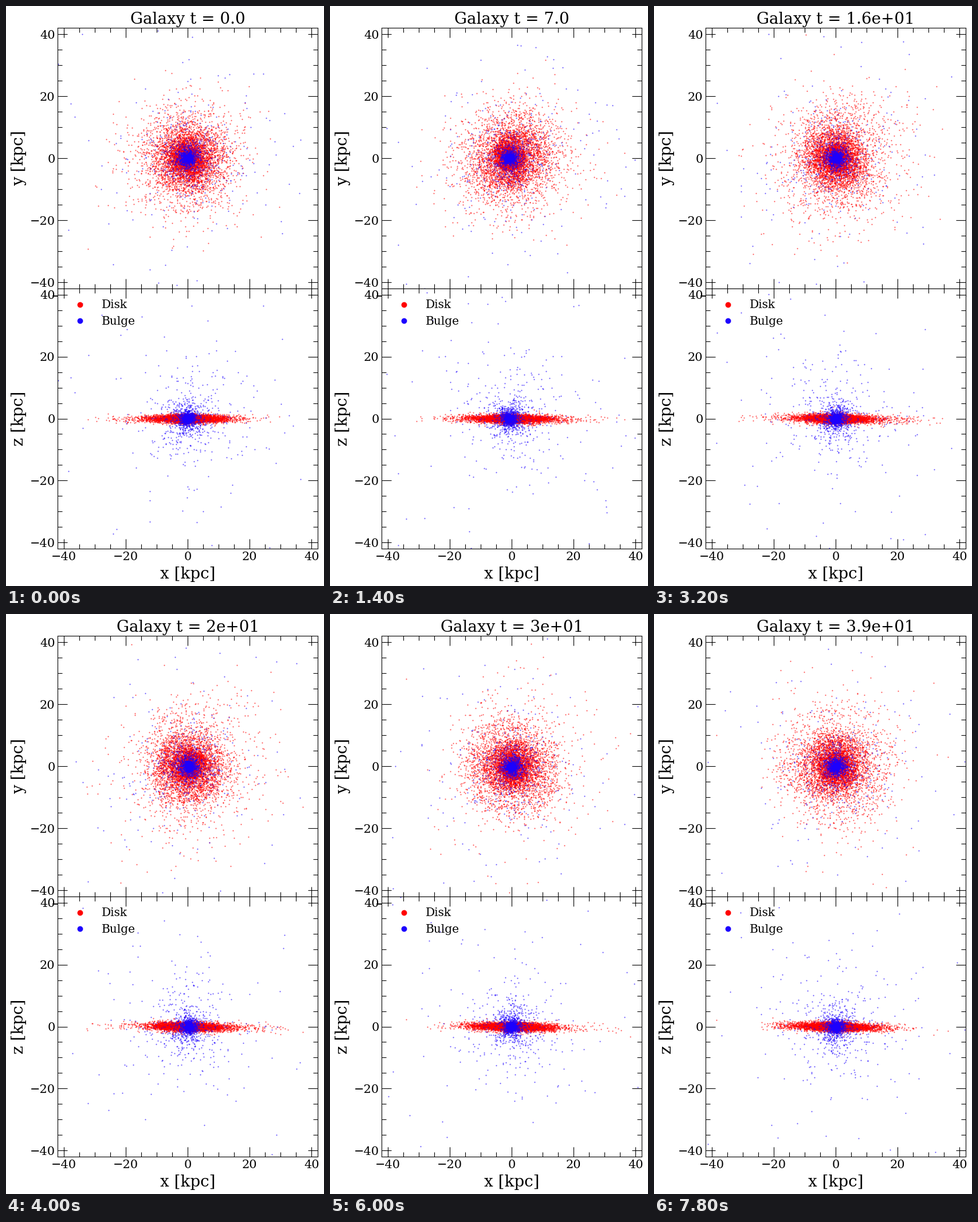
Recreate the animation shown at these times as a matplotlib script. Size 555 px wide and 1010 px high, loop 8000 ms.

```python
import numpy as np
import matplotlib.pyplot as plt
from matplotlib.animation import FuncAnimation
from matplotlib.ticker import MultipleLocator

W, H, DPI = 555, 1010, 100
FRAMES, INTERVAL = 40, 200
SUBSTEPS = 16
N_DISK, N_BULGE = 5800, 1750
V0 = 2.6      # flat rotation speed, kpc per frame
CORE = 1.0    # softening of the potential, kpc
RED, BLUE = "#ff0000", "#1c00ff"

plt.rcParams.update({"font.family": "DejaVu Serif", "font.size": 15})
rng = np.random.default_rng(12)


def v_circ(r):
    return V0 * r / np.sqrt(r**2 + CORE**2)


def make_disk(n):
    """Thin exponential disk, turning counter-clockwise, with a small kick."""
    r = rng.gamma(2, 3.5, n)
    th = rng.uniform(0, 2 * np.pi, n)
    v = v_circ(r)
    v_r = v * (0.1 * np.cos(2 * th + 0.6) + 0.06 * np.cos(th)
               + rng.normal(0, 0.17, n))
    v_t = v * (1 + rng.normal(0, 0.11, n))
    c, s = np.cos(th), np.sin(th)
    z = rng.normal(0, 0.65, n)
    v_z = rng.normal(0, 0.65, n) * v / np.hypot(r, CORE)
    pos = np.column_stack([r * c, r * s, z])
    vel = np.column_stack([v_r * c - v_t * s, v_r * s + v_t * c, v_z])
    return pos, vel


def make_bulge(n):
    """Isotropic Hernquist sphere."""
    q = np.sqrt(rng.uniform(0, 0.985**2, n))
    r = 1.1 * q / (1 - q)
    u = rng.normal(size=(n, 3))
    u /= np.linalg.norm(u, axis=1, keepdims=True)
    slope = (1 + 4 * r) / (1 + r)
    sigma = 1.12 * V0 * np.sqrt(r / (r + 1) / slope)
    return u * r[:, None], rng.normal(size=(n, 3)) * sigma[:, None]


def accel(pos):
    r2 = np.sum(pos**2, axis=1, keepdims=True)
    return -V0**2 * pos / (r2 + CORE**2)


def bump(t, mid, width):
    return np.exp(-((t - mid) / width)**2)


def disturb(pos, t):
    """Let the centre wander slightly and the disk plane tilt with time."""
    out = pos.copy()
    weight = 1 / (1 + np.sum(pos**2, axis=1) / 64)
    out[:, 0] += weight * (0.4 * bump(t, 20, 4) - 0.8 * bump(t, 7, 4))
    out[:, 1] += weight * (0.3 * bump(t, 10, 4) - 0.2 * bump(t, 30, 5))
    out[:, 2] -= 0.02 * min(t / 20, 1) * pos[:, 0]
    return out


def simulate():
    """Leapfrog all stars through the potential, one snapshot per frame."""
    pos, vel = (np.vstack(p) for p in zip(make_disk(N_DISK),
                                          make_bulge(N_BULGE)))
    dt = 1 / SUBSTEPS
    shots = []
    for t in range(FRAMES):
        shots.append(disturb(pos, t))
        for _ in range(SUBSTEPS):
            vel += accel(pos) * dt / 2
            pos += vel * dt
            vel += accel(pos) * dt / 2
    return shots


def make_panel(top, bottom, ylabel):
    ax = fig.add_axes([90.4 / W, 1 - bottom / H, 453.6 / W, (bottom - top) / H])
    ax.set(xlim=(-42, 42), ylim=(-42, 42))
    ax.set_ylabel(ylabel, fontsize=20)
    for axis in (ax.xaxis, ax.yaxis):
        axis.set_major_locator(MultipleLocator(20))
        axis.set_minor_locator(MultipleLocator(5))
    ax.tick_params(which="both", direction="in", top=True, right=True, width=0.8)
    ax.tick_params(which="major", length=12)
    ax.tick_params(which="minor", length=6)
    return ax


def star_layer(ax, color):
    return ax.plot([], [], "o", ms=1.5, mew=0, color=color, alpha=0.68)[0]


def legend_row(ax, y, color, name):
    ax.plot([-34.85], [y], "o", ms=7.1, mew=0, color=color, zorder=5)
    ax.text(-27.88, y - 1.25, name, fontsize=14.5, zorder=5)


fig = plt.figure(figsize=(W / DPI, H / DPI), dpi=DPI, facecolor="white")
# The lower panel hides most of the upper one's x tick labels.
face_on = make_panel(38.4, 491.8, "y [kpc]")
edge_on = make_panel(491.8, 945.2, "z [kpc]")
edge_on.set_xlabel("x [kpc]", fontsize=20, labelpad=4.7)
title = face_on.set_title("", fontsize=20, pad=5.3)
legend_row(edge_on, 36.85, RED, "Disk")
legend_row(edge_on, 31.55, BLUE, "Bulge")

groups = [(slice(0, N_DISK), RED), (slice(N_DISK, None), BLUE)]
layers = [(star_layer(ax, color), part, dim)
          for ax, dim in ((face_on, 1), (edge_on, 2))
          for part, color in groups]
snapshots = simulate()


def update(i):
    stars = snapshots[i]
    for line, part, dim in layers:
        line.set_data(stars[part, 0], stars[part, dim])
    title.set_text(f"Galaxy t = {float(i):.2}")
    return [title] + [layer[0] for layer in layers]


anim = FuncAnimation(fig, update, frames=FRAMES, interval=INTERVAL,
                     repeat=True, repeat_delay=0, blit=False)
plt.show()
```
